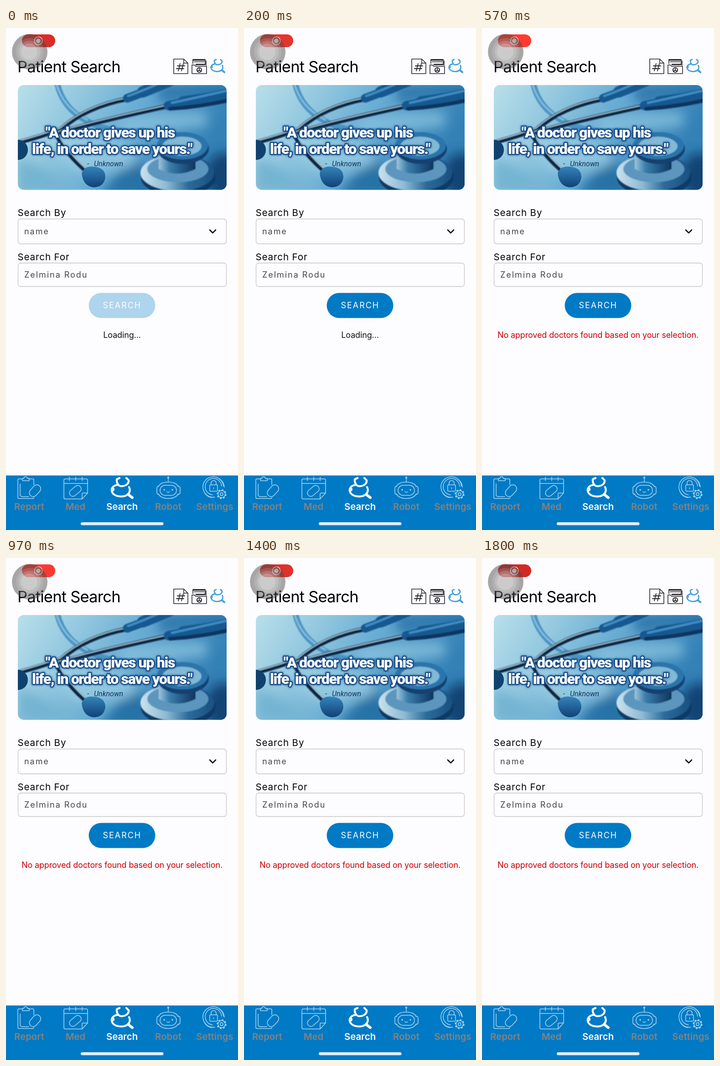
Recreate the animation shown at these times as an HTML page. Size 509x1100 px, loop 1.83 s.

```html
<!DOCTYPE html>
<html lang="en">
<head>
<meta charset="utf-8">
<title>Patient Search</title>
<style>
  html, body { margin: 0; width: 100%; height: 100%; overflow: hidden; background: #fdfcff; }
  svg { display: block; width: 100%; height: 100%; }
  text { font-family: Inter, Roboto, sans-serif; white-space: pre; }
  .line { fill: none; stroke-linecap: round; stroke-linejoin: round; }
  .title { font-size: 34.5px; letter-spacing: -.8px; }
  .label { font-size: 20.5px; letter-spacing: .9px; }
  .value { font-size: 18px; letter-spacing: 1.95px; fill: #46464a; }
  .message { font-size: 18px; letter-spacing: -.14px; text-anchor: middle; }
  .box { fill: none; stroke: #c8c5c1; stroke-width: 1.3; }
  .quote { font: 900 32.2px Roboto, sans-serif; letter-spacing: -1.4px; fill: #fff;
           stroke: #174b88; stroke-width: 4.5px; stroke-linejoin: round; paint-order: stroke;
           filter: drop-shadow(0 0 2px #174b88); }
  .author { font: italic 16px Roboto, sans-serif; fill: #14325e; }
  .tabs text { font-size: 20.4px; font-weight: 600; text-anchor: middle; fill: #84827f; }
  .tabs .active { fill: #fff; }
  .tab-icon { stroke: #a9d6f2; stroke-width: 1.5; }
</style>
</head>
<body>
<svg viewBox="0 0 509 1100" preserveAspectRatio="none">
  <defs>
    <linearGradient id="sky" x1="0" y1="0" x2="1" y2=".3">
      <stop offset="0" stop-color="#b9dfea"/>
      <stop offset=".3" stop-color="#93c8df"/>
      <stop offset=".6" stop-color="#66abd2"/>
      <stop offset="1" stop-color="#3481b6"/>
    </linearGradient>
    <linearGradient id="metal">
      <stop offset="0" stop-color="#cbe2ed"/>
      <stop offset=".35" stop-color="#8dbad3"/>
      <stop offset=".65" stop-color="#2c6a99"/>
      <stop offset="1" stop-color="#1a5081"/>
    </linearGradient>
    <linearGradient id="neck">
      <stop offset="0" stop-color="#9cc4da"/>
      <stop offset=".3" stop-color="#3a7caa"/>
      <stop offset="1" stop-color="#0d355f"/>
    </linearGradient>
    <linearGradient id="rubber" x1="0" y1="0" x2="0" y2="1">
      <stop offset="0" stop-color="#3583bb"/>
      <stop offset="1" stop-color="#0f4278"/>
    </linearGradient>
    <filter id="soft" x="-30%" y="-30%" width="160%" height="160%"><feGaussianBlur stdDeviation="12"/></filter>
    <filter id="slight"><feGaussianBlur stdDeviation="1.2"/></filter>
    <clipPath id="card"><rect x="26" y="125" width="458" height="229.5" rx="13"/></clipPath>
    <g id="scope" class="line">
      <path stroke-width="4.2" d="M20 3 14 6C13 14 18 22 26 21C36 20 41 14 40 8L35 3"/>
      <path stroke-width="4.2" d="M17 18C4 19 0 29 5 36C10 44 28 46 37 40C43 36 44 28 41 23"/>
      <path stroke-width="6" d="M39 39 48 46"/>
      <circle cx="5" cy="28" r="2.5" stroke-width="3"/>
    </g>
  </defs>

  <rect width="509" height="1100" fill="#fdfcff"/>

  <!-- header -->
  <rect id="recorder" x="35" y="14" width="73" height="28" rx="14" fill="#d92d27"/>
  <g fill="#fff">
    <circle cx="71" cy="28" r="8.6" fill="none" stroke="#fff" stroke-width="1.8"/>
    <circle cx="71" cy="28" r="5"/>
  </g>
  <text class="title" x="25" y="96.5">Patient Search</text>
  <circle cx="52" cy="52" r="39" fill="#4f4a4a" opacity=".49"/>
  <g fill="#fff">
    <circle cx="52" cy="52" r="30" opacity=".13"/>
    <circle cx="52" cy="52" r="24" opacity=".17"/>
    <circle cx="51" cy="52" r="18" opacity=".2"/>
  </g>

  <g class="line" stroke="#29292d" stroke-width="1.6">
    <path d="M368 68H390L399 77V100H368ZM390 68V77H399"/>
    <path stroke-width="1.8" d="M382 78 378 94M389 78 385 94M376 83H392M374 89H390"/>
    <path d="M408 81H413L416 84H440V100H408Z"/>
    <path d="M410 78V69H437V80M413 74H435M439 72V82"/>
    <path stroke-width="3" d="M411 70H436M417 80H436"/>
    <circle cx="424" cy="92" r="5" stroke-width="2.2"/>
    <path d="M424 88V92L420 95M424 92 428 95"/>
  </g>
  <use href="#scope" stroke="#3f9fd8" transform="translate(448 67) scale(.65)"/>

  <!-- banner -->
  <g clip-path="url(#card)">
    <rect x="26" y="125" width="458" height="230" fill="url(#sky)"/>
    <g filter="url(#soft)">
      <path d="M26 360V285Q100 310 160 360Z" fill="#74b4d1"/>
      <path d="M60 240Q150 220 270 255L290 300L160 320Z" fill="#9fd0e3" opacity=".7"/>
      <path d="M205 370Q250 300 300 290L330 370Z" fill="#1f6ba0" opacity=".85"/>
      <path d="M330 125H490V150Q400 150 340 165Z" fill="#1d659f" opacity=".7"/>
      <path d="M250 200Q340 185 440 185V215Q350 220 260 235Z" fill="#8fc6e0" opacity=".7"/>
      <ellipse cx="478" cy="325" rx="42" ry="52" fill="#0c3e6d" opacity=".9"/>
    </g>
    <g class="line" filter="url(#slight)">
      <path stroke="#4c94c5" stroke-width="13" d="M112 120Q124 176 178 204T300 225"/>
      <path stroke="#84bcdb" stroke-width="4" d="M110 120Q124 174 178 201"/>
      <g stroke="#0d2543" stroke-width="10">
        <path d="M26 251Q78 237 120 222Q176 172 268 155"/>
        <path d="M110 231Q190 207 355 171"/>
        <path d="M108 228Q130 276 184 320"/>
      </g>
      <g stroke="#a9cde0" stroke-width="2.2">
        <path d="M26 248Q78 234 119 219Q176 169 266 153"/>
        <path d="M110 228Q190 204 353 169"/>
        <path d="M112 228Q134 274 186 317"/>
      </g>
      <g stroke="#16588f">
        <path stroke-width="19" d="M266 154Q315 137 350 118"/>
        <path stroke-width="25" d="M300 140Q335 126 360 115"/>
        <path stroke-width="20" d="M356 170Q420 158 490 142"/>
        <path stroke-width="29" d="M390 164Q440 158 500 146"/>
      </g>
      <path stroke="#0b355f" stroke-width="8" d="M360 177Q425 173 490 158"/>
      <path stroke="#3f8cc2" stroke-width="5" d="M268 149Q312 133 340 119M364 164Q420 152 490 136"/>
    </g>
    <ellipse cx="27" cy="267" rx="21" ry="22" fill="#10426f"/>
    <path d="M166 318Q172 301 194 304Q218 306 218 327Q215 349 191 349Q169 346 166 318Z" fill="url(#rubber)"/>
    <g filter="url(#slight)">
      <ellipse cx="378" cy="327" rx="82" ry="42" fill="#0d3b66"/>
      <ellipse cx="376" cy="317" rx="81" ry="40" fill="url(#metal)"/>
      <ellipse cx="377" cy="309" rx="67" ry="29" fill="#5b96be"/>
      <path d="M335 265V309Q376 329 416 309V265Z" fill="url(#neck)"/>
      <ellipse cx="388" cy="264" rx="57" ry="34" fill="#123f70"/>
      <ellipse cx="387" cy="258" rx="56" ry="30" fill="#2a75ac"/>
      <ellipse cx="386" cy="259" rx="43" ry="21" fill="#82b9d6"/>
    </g>
    <text class="quote" x="87" y="239.5">"A doctor gives up his</text>
    <text class="quote" x="57" y="275.5">life, in order to save yours."</text>
    <text class="author" x="178" y="303">-</text>
    <text class="author" x="193" y="303">Unknown</text>
  </g>

  <!-- form -->
  <text class="label" x="25.5" y="412">Search By</text>
  <rect class="box" x="26.5" y="418.5" width="457" height="54.5" rx="6"/>
  <text class="value" x="40" y="451.5">name</text>
  <path class="line" stroke="#111" stroke-width="2.6" d="M447 442.5 453.5 449 460 442.5"/>
  <text class="label" x="25.5" y="509">Search For</text>
  <rect class="box" x="26.5" y="515" width="457" height="51.5" rx="6"/>
  <text class="value" x="40" y="547">Zelmina Rodu</text>
  <g id="button">
    <rect x="181.5" y="580.5" width="146" height="55" rx="27.5" fill="#007ac5"/>
    <text class="value" x="212.5" y="614" style="fill:#fff">SEARCH</text>
  </g>
  <text id="loading" class="message" x="254.5" y="678.5" fill="#111">Loading...</text>
  <text id="result" class="message" x="254.5" y="678.5" fill="#c90004" opacity="0">No approved doctors found based on your selection.</text>

  <!-- tab bar -->
  <rect y="980.5" width="509" height="119.5" fill="#007ac5"/>
  <g class="line tab-icon">
    <path d="M36 988H28Q26 988 26 990V1029Q26 1031 28 1031H59Q61 1031 61 1029M50 988H59Q61 988 61 990V1001"/>
    <path d="M36 992V987H39Q40 983 43 983T47 987H51V992ZM31 999V1024L34 1027H50"/>
    <rect x="49" y="1006" width="29" height="17" rx="8.5" transform="rotate(-48 63 1014)"/>

    <path d="M130 988H176Q179 988 179 991V1019L167 1032H130Q127 1032 127 1029V991Q127 988 130 988ZM127 998H179M167 1032V1021Q167 1019 169 1019H179"/>
    <path d="M139 984V992M153 984V992M167 984V992"/>
    <rect x="138" y="1007" width="29" height="15" rx="7.5" transform="rotate(-40 152 1015)"/>

    <path d="M356 986V995M334 1005Q339 995 356 995T378 1005M334 1021Q340 1031 356 1031T378 1021"/>
    <path d="M335 1004Q331 1004 331 1009V1017Q331 1022 335 1022M377 1004Q382 1004 382 1009V1017Q382 1022 377 1022"/>
    <circle cx="356" cy="985" r="1.5"/>
    <rect x="338" y="1002" width="36" height="22" rx="11"/>
    <path d="M353 1016Q356 1019 359 1016"/>
    <path stroke-width="3.5" d="M347 1012h.1M365 1012h.1"/>

    <path d="M458 1028A22.5 22.5 0 1 1 477 1004M453 1023A18 18 0 1 1 473 1004"/>
    <path d="M436 1019A23 23 0 0 0 452 1029M468 988A23 23 0 0 1 479 1006"/>
    <rect x="447" y="1001" width="17" height="14" rx="2"/>
    <path d="M450 1001V997A5.5 5.5 0 0 1 461 997V1001M455.5 1007V1010"/>
    <circle cx="473" cy="1021.5" r="7.8"/>
    <circle cx="473" cy="1021.5" r="3.2"/>
    <circle cx="473" cy="1021.5" r="9.4" stroke-width="2.6" stroke-linecap="butt" stroke-dasharray="3.7 3.682"/>
  </g>
  <use href="#scope" stroke="#fff" transform="translate(229 983)"/>
  <g class="tabs">
    <text x="51" y="1055.5">Report</text>
    <text x="152.5" y="1055.5">Med</text>
    <text class="active" x="254.5" y="1055.5">Search</text>
    <text x="356" y="1055.5">Robot</text>
    <text x="458" y="1055.5">Settings</text>
  </g>
  <rect x="164" y="1083" width="181.5" height="6.5" rx="3.25" fill="#e4edf4"/>
</svg>

<script>
const LOOP = 1830;
const RESULT_AT = 270;

// Each step is [time in ms, value].
function loop(id, property, steps, easing = "linear") {
  const frames = steps.map(([time, value]) => ({ offset: time / LOOP, [property]: value, easing }));
  document.getElementById(id).animate(frames, { duration: LOOP, iterations: Infinity });
}

const easeInOut = p => p < .5 ? 2 * p * p : 1 - 2 * (1 - p) ** 2;

// The button release is already 62 ms into its 250 ms fade when the loop begins.
const release = Array.from({ length: 9 }, (_, i) => {
  const time = i * 23.5;
  return [time, .2 + .8 * easeInOut(Math.min(1, (time + 62) / 250))];
});

loop("button", "opacity", [...release, [LOOP, 1]]);
loop("loading", "opacity", [[0, 1], [RESULT_AT, 0], [LOOP, 0]], "step-end");
loop("result", "opacity", [[0, 0], [RESULT_AT, 1], [LOOP, 1]], "step-end");
loop("recorder", "fill", [
  [0, "#d92d27"], [200, "#e6342c"], [330, "#f0382f"], [570, "#ff3b30"],
  [850, "#ff3b30"], [970, "#fa3a30"], [1400, "#e0312a"], [LOOP, "#d02924"]
]);
</script>
</body>
</html>
```
